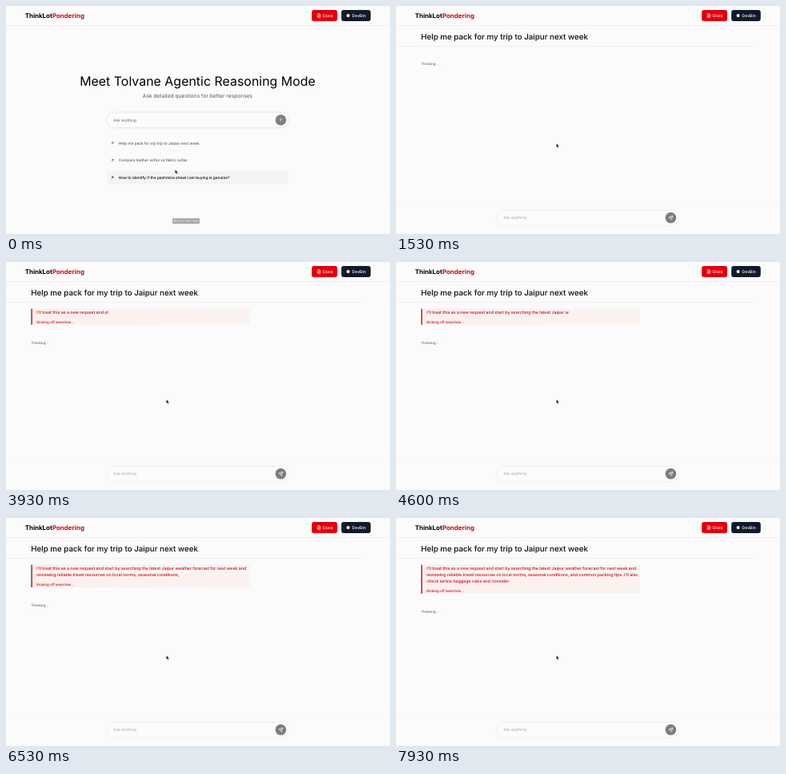
Recreate the animation shown at these times as an HTML page. Size 480 by 286 pixels, loop 8 s.

```html
<!DOCTYPE html>
<html lang="en">
<head>
<meta charset="utf-8">
<title>Reasoning chat</title>
<style>
  html, body { margin: 0; width: 100%; height: 100%; overflow: hidden; background: #fbfbfb; }
  svg { display: block; width: 480px; height: 286px; }
  text {
    font-family: Inter, "Open Sans", sans-serif;
    text-rendering: geometricPrecision;
    white-space: pre;
  }
  .brand { font-size: 7.94px; font-weight: 700; }
  .button { font-size: 5.1px; font-weight: 500; fill: #fff; }
  .hero { font-size: 15.95px; fill: #000; text-anchor: middle; }
  .sub { font-size: 6.68px; fill: #575757; text-anchor: middle; }
  .title { font-size: 9.78px; font-weight: 500; fill: #0a0a0a; }
  .ask { font-size: 4.65px; }
  .option { font-size: 4.73px; font-weight: 500; fill: #585858; }
  .option path { stroke: #444; }
  .option rect { fill: none; }
  .option.hover { fill: #000; }
  .option.hover path { stroke: #000; }
  .option.hover rect { fill: #f4f4f3; }
  .tip { font-size: 4px; fill: #e6e6e6; text-anchor: middle; }
  .thinking { font-size: 4.3px; font-weight: 500; fill: #666; }
  .answer { font-size: 5.24px; font-weight: 500; fill: #bd0a1e; }
  .kick { font-size: 4.4px; font-weight: 500; fill: #bd0a1e; }
  .line { fill: none; stroke-linecap: round; stroke-linejoin: round; }
  .rule { stroke: #f0f0f0; }
  .rule.faint { stroke: #f6f6f6; }
  .pill { fill: #fcfcfc; filter: drop-shadow(0 .8px .8px rgba(0, 0, 0, .1)); }
</style>
</head>
<body>
<svg viewBox="0 0 480 286">
  <defs>
    <linearGradient id="tint">
      <stop offset="0" stop-color="#fcf0ee"/>
      <stop offset="1" stop-color="#fbf3f0"/>
    </linearGradient>
  </defs>
  <rect width="480" height="286" fill="#fbfbfb"/>

  <g id="header">
    <path class="rule" d="M0 24.5H480"/>
    <text class="brand" x="23.7" y="14.7">ThinkLot<tspan fill="#d50012">Pondering</tspan></text>
    <rect x="382.2" y="5" width="32" height="13.9" rx="2.9" fill="#e2000d"/>
    <path class="line" stroke="#fff" stroke-width=".6" d="M391.3 9.7h-2v4.6h3.6v-3zv1.6h1.6M390.2 12.2h1.7M390.2 13.2h1.7"/>
    <text class="button" x="396" y="13.9">Docs</text>
    <rect x="419.2" y="5" width="36.6" height="13.9" rx="2.9" fill="#121a2a"/>
    <circle cx="427.6" cy="12" r="2" fill="#fff"/>
    <text class="button" x="432.6" y="13.9">DevBin</text>
  </g>

  <g id="home">
    <text class="hero" x="239.5" y="99.8">Meet Tolvane Agentic Reasoning Mode</text>
    <text class="sub" x="239.5" y="115">Ask detailed questions for better responses</text>
    <rect class="pill" x="126.2" y="133.7" width="226.6" height="18.6" rx="9.3" stroke="#e6e6e6" stroke-width=".5"/>
    <text class="ask" x="134.4" y="144.7" fill="#5c5c5c">Ask anything</text>
    <circle cx="343.5" cy="143" r="6.8" fill="#808080"/>
    <path class="line" stroke="#e0e0e0" stroke-width=".6" d="M343.5 144.8v-3.6m-1.6 1.6l1.6-1.6l1.6 1.6"/>
    <g id="options"></g>
    <rect x="208" y="266.3" width="34" height="7" rx="1.2" fill="#a9a9a9"/>
    <text class="tip" x="225" y="271.2">Build in My Flow</text>
  </g>

  <g id="chat">
    <text class="title" x="31.2" y="42.3">Help me pack for my trip to Jaipur next week</text>
    <path class="rule" d="M0 50.5H448"/>
    <path class="rule faint" d="M0 247.5H480"/>
    <g id="reply">
      <rect id="box" x="31.3" y="58.5" width="273.7" rx="1" fill="url(#tint)"/>
      <rect id="bar" x="31.4" y="58.5" width="1.5" rx=".5" fill="#b8222b"/>
      <text class="answer" x="38.2" y="64.5"></text>
      <text class="answer" x="38.2" y="72.6"></text>
      <text class="answer" x="38.2" y="80.7"></text>
      <text class="kick" id="kick" x="38.2">Kicking off searches...</text>
    </g>
    <text class="thinking" id="thinking" x="31.5">Thinking...</text>
    <rect class="pill" x="126.5" y="256.8" width="226" height="18" rx="9"/>
    <text class="ask" x="134.4" y="267.4" fill="#a3a3a3">Ask anything</text>
    <circle cx="343.5" cy="265.6" r="6.8" fill="#7d7d7d"/>
    <path class="line" stroke="#fff" stroke-width=".6" d="M345.8 263.3l-4.8 1.7l2 1.1l1.1 2zl-2.8 2.8"/>
  </g>

  <path id="cursor" d="M0 0v5l1.2-1l.9 1.9l.9-.4l-.9-1.8h1.6z" fill="#000" stroke="#fff" stroke-width=".4"/>
</svg>
<script>
  const LOOP = 8000, STEP = 1000 / 15;
  const OPEN = 5, REPLY = 49, KICK = 54, LAST = 119;
  const CHARS_PER_STEP = 3.635;
  const TOP = 58.5, LINE = 8.1, KICK_HEIGHT = 12.2;

  const lines = [
    "I'll treat this as a new request and start by searching the latest Jaipur weather forecast for next week and ",
    "reviewing reliable travel resources on local norms, seasonal conditions, and common packing tips. I'll also ",
    "check airline baggage rules and consider"
  ];
  const prompts = [
    "Help me pack for my trip to Jaipur next week",
    "Compare leather sofas vs fabric sofas",
    "How to identify if the pashmina shawl I am buying is genuine?"
  ];
  // Pointer position and hovered option on the way to the click
  const route = [[211.4, 205.2, 2], [208, 194, 1], [204, 183, 1], [201, 175, 0], [200.4, 172.4, 0]];

  const $ = id => document.getElementById(id);
  const show = (el, on) => el.setAttribute("display", on ? "inline" : "none");
  const rows = document.querySelectorAll(".answer");

  $("options").innerHTML = prompts.map((label, i) => {
    const y = 172 + i * 21.65;
    return `<g class="option">
      <rect x="126" y="${y - 8.3}" width="227" height="16.6" rx="2"/>
      <path class="line" stroke-width=".6" d="M132.1 ${y + .8}l1.9-1.9m-1.6 0h1.6v1.6"/>
      <text x="140.8" y="${y + 1.7}">${label}</text></g>`;
  }).join("");
  const options = document.querySelectorAll(".option");

  function drawReply(step) {
    let left = Math.floor(3 + (step - REPLY) * CHARS_PER_STEP);
    let used = 0;
    lines.forEach((line, i) => {
      const part = line.slice(0, Math.max(0, left));
      rows[i].textContent = part;
      if (part) used++;
      left -= line.length;
    });
    const kicked = step >= KICK;
    const height = used * LINE + (kicked ? KICK_HEIGHT : 0);
    $("box").setAttribute("height", height);
    $("bar").setAttribute("height", height);
    $("kick").setAttribute("y", TOP + height - 2);
    show($("kick"), kicked);
    return TOP + height + 23.9;
  }

  function draw() {
    const time = performance.now() % LOOP;
    const step = Math.min(LAST, Math.floor((time + 4) / STEP));
    const [x, y, hover] = route[Math.min(step, route.length - 1)];
    const replying = step >= REPLY;
    show($("home"), step < OPEN);
    show($("chat"), step >= OPEN);
    show($("reply"), replying);
    options.forEach((el, i) => el.classList.toggle("hover", i === hover));
    $("cursor").setAttribute("transform", `translate(${x} ${y})`);
    $("thinking").setAttribute("y", replying ? drawReply(step) : 74.3);
    requestAnimationFrame(draw);
  }
  draw();
</script>
</body>
</html>
```
